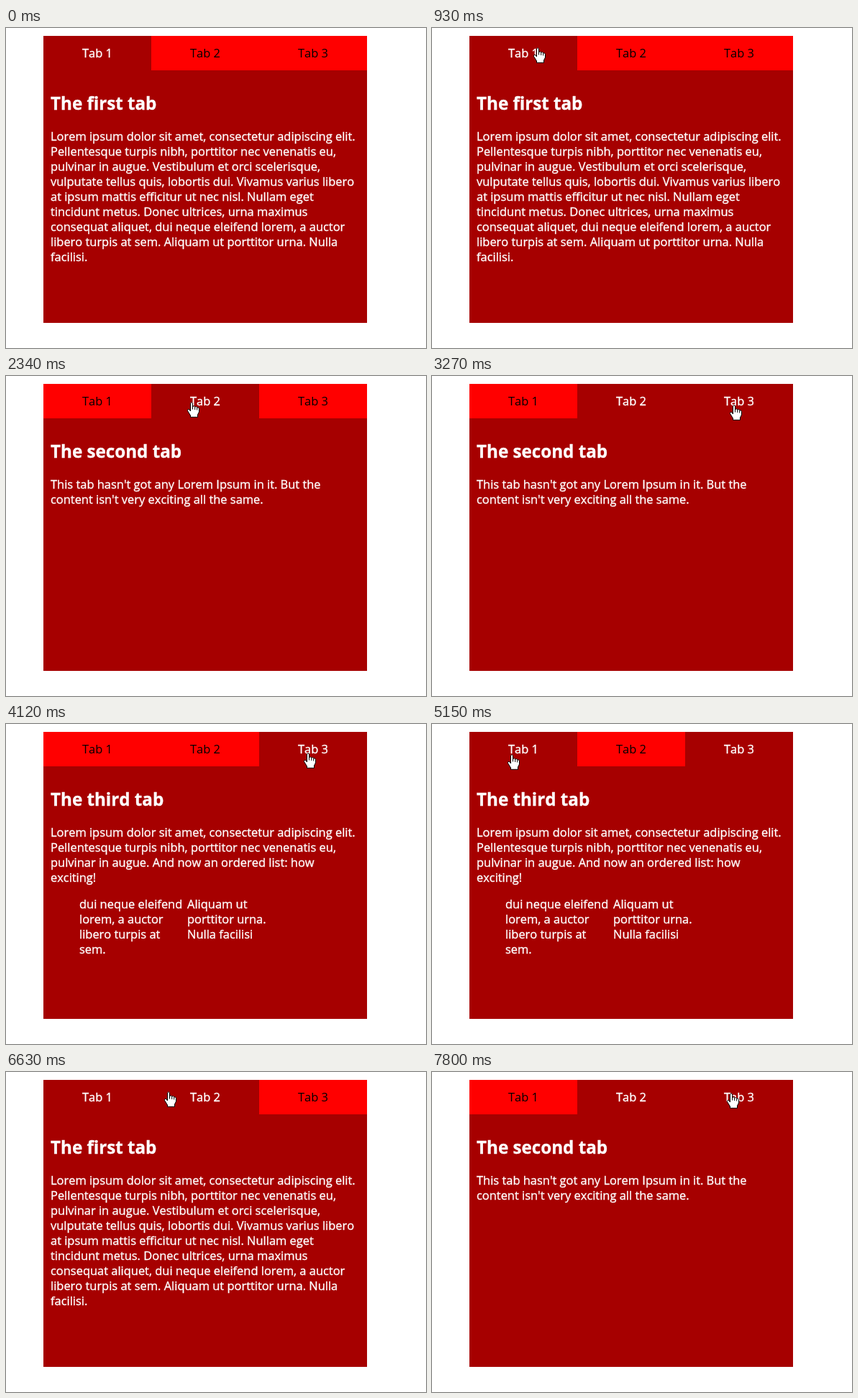
Write an HTML page that moves like this. It is 584 by 446 pixels and loops after 8 s.

```html
<!DOCTYPE html>
<html lang="en">
<head>
<meta charset="utf-8">
<title>Tabs</title>
<style>
  html, body { margin: 0; width: 100%; height: 100%; overflow: hidden; background: #fff; }
  svg { display: block; }
  text { font: 16.45px "Open Sans", sans-serif; font-kerning: none; fill: #fff; stroke: #fff; stroke-width: .35px; white-space: pre; }
  .title { font-size: 24.2px; font-weight: 700; }
  .tab rect { fill: #f00; }
  .tab text { fill: #000; stroke: none; text-anchor: middle; }
  .tab.dark rect { fill: #a60000; }
  .tab.dark text { fill: #fff; stroke: #fff; }
  #cursor path { fill: #fff; stroke: #000; stroke-linejoin: round; }
</style>
</head>
<body>
<svg width="584" height="446" viewBox="0 0 584 446">
  <rect x="52" y="11" width="450" height="400" fill="#a60000"/>
  <g id="tabs"></g>
  <g id="pages"></g>
  <g id="cursor">
    <g id="hand">
      <path d="M-1.5 2Q0-.8 1.5 2V6.5Q3.5 5 4.7 7Q6.5 5.8 7.7 7.8Q9.6 7 10.5 9.5V14L8.5 18V21.3H-1.5V19L-5.5 12.5Q-5.5 9.5-3 10.8L-1.5 13Z"/>
      <path d="M1.5 6V10.5M4.7 7V11M7.7 8V11.5"/>
    </g>
    <path id="arrow" d="M.5.5V16.5L4.3 13L6.8 18.5L9.2 17.4L6.8 12H11.8Z"/>
  </g>
</svg>
<script>
const LOOP = 8000, STEP = 78;
const LEFT = 52, TOP = 11, TAB_W = 150, TAB_H = 48, LINE = 21;
const $ = id => document.getElementById(id);

const intro = `Lorem ipsum dolor sit amet, consectetur adipiscing elit.
Pellentesque turpis nibh, porttitor nec venenatis eu,
pulvinar in augue. `;

const pages = [
  { title: "The first tab", columns: [], body: intro + `Vestibulum et orci scelerisque,
vulputate tellus quis, lobortis dui. Vivamus varius libero
at ipsum mattis efficitur ut nec nisl. Nullam eget
tincidunt metus. Donec ultrices, urna maximus
consequat aliquet, dui neque eleifend lorem, a auctor
libero turpis at sem. Aliquam ut porttitor urna. Nulla
facilisi.` },
  { title: "The second tab", columns: [], body: `This tab hasn't got any Lorem Ipsum in it. But the
content isn't very exciting all the same.` },
  { title: "The third tab", body: intro + "And now an ordered list: how\nexciting!", columns: [
    "dui neque eleifend\nlorem, a auctor\nlibero turpis at\nsem.",
    "Aliquam ut\nporttitor urna.\nNulla facilisi"] }
];

const clickTimes = [2340, 4120, 5690, 7250];
const entry = { x: 493, y: 340 };
// sag: how far the path dips below a straight line
const moves = [
  { from: 70, to: 930, x: 147, y: 27 },
  { from: 1710, to: 1870, x: 258, y: 36 },
  { from: 2880, to: 2960, x: 420, y: 57 },
  { from: 3190, to: 3270, x: 420, y: 40 },
  { from: 4510, to: 5150, x: 111, y: 42, sag: 183 },
  { from: 6470, to: 6630, x: 226, y: 27 },
  { from: 7480, to: 7800, x: 416, y: 29, sag: 12 }
];

const textTag = (x, y, s, cls = "") => `<text x="${x}" y="${y}" class="${cls}">${s}</text>`;
const block = (x, y, s) => s.split("\n").map((line, i) => textTag(x, y + LINE * i, line)).join("");

$("tabs").innerHTML = pages.map((_, i) => {
  const x = LEFT + TAB_W * i;
  return `<g class="tab"><rect x="${x}" y="${TOP}" width="${TAB_W}" height="${TAB_H}"/>` +
    textTag(x + TAB_W / 2, TOP + 30, `Tab ${i + 1}`) + "</g>";
}).join("");

$("pages").innerHTML = pages.map(({ title, body, columns }) => {
  const y = 157, below = y + LINE * body.split("\n").length + 16;
  return "<g>" + textTag(LEFT + 10, 114, title, "title") + block(LEFT + 10, y, body) +
    columns.map((s, i) => block(LEFT + 50 + TAB_W * i, below, s)).join("") + "</g>";
}).join("");

const easeOut = p => 1 - (1 - p) ** 1.4;

// The pointer advances in discrete steps, slowing towards each stop.
function pointerAt(t) {
  let last = entry, pos = null;
  for (const move of moves) {
    if (t < move.from) break;
    const span = move.to - move.from;
    const count = Math.round(span / STEP) + 1;
    const step = Math.floor((t - move.from) / span * (count - 1) + 1e-6) + 1;
    const u = easeOut(Math.min(1, step / count));
    const dip = (move.sag || 0) * Math.sin(Math.PI * u);
    pos = {
      x: Math.round(last.x + (move.x - last.x) * u),
      y: Math.round(last.y + (move.y - last.y) * u + dip)
    };
    last = move;
  }
  return pos;
}

const tabUnder = pos =>
  pos && pos.y < TOP + TAB_H ? Math.floor((pos.x - LEFT) / TAB_W) : -1;

function draw(t) {
  const pos = pointerAt(t), hover = tabUnder(pos);
  const click = clickTimes.filter(c => c <= t).pop();
  const active = click ? tabUnder(pointerAt(click)) : 0;
  const show = (el, on) => el.style.display = on ? "" : "none";

  [...$("tabs").children].forEach((el, i) => el.classList.toggle("dark", i === active || i === hover));
  [...$("pages").children].forEach((el, i) => show(el, i === active));
  show($("cursor"), pos);
  show($("hand"), hover >= 0);
  show($("arrow"), hover < 0);
  if (pos) $("cursor").setAttribute("transform", `translate(${pos.x} ${pos.y})`);
}

function tick() {
  draw(performance.now() % LOOP);
  requestAnimationFrame(tick);
}
tick();
</script>
</body>
</html>
```
